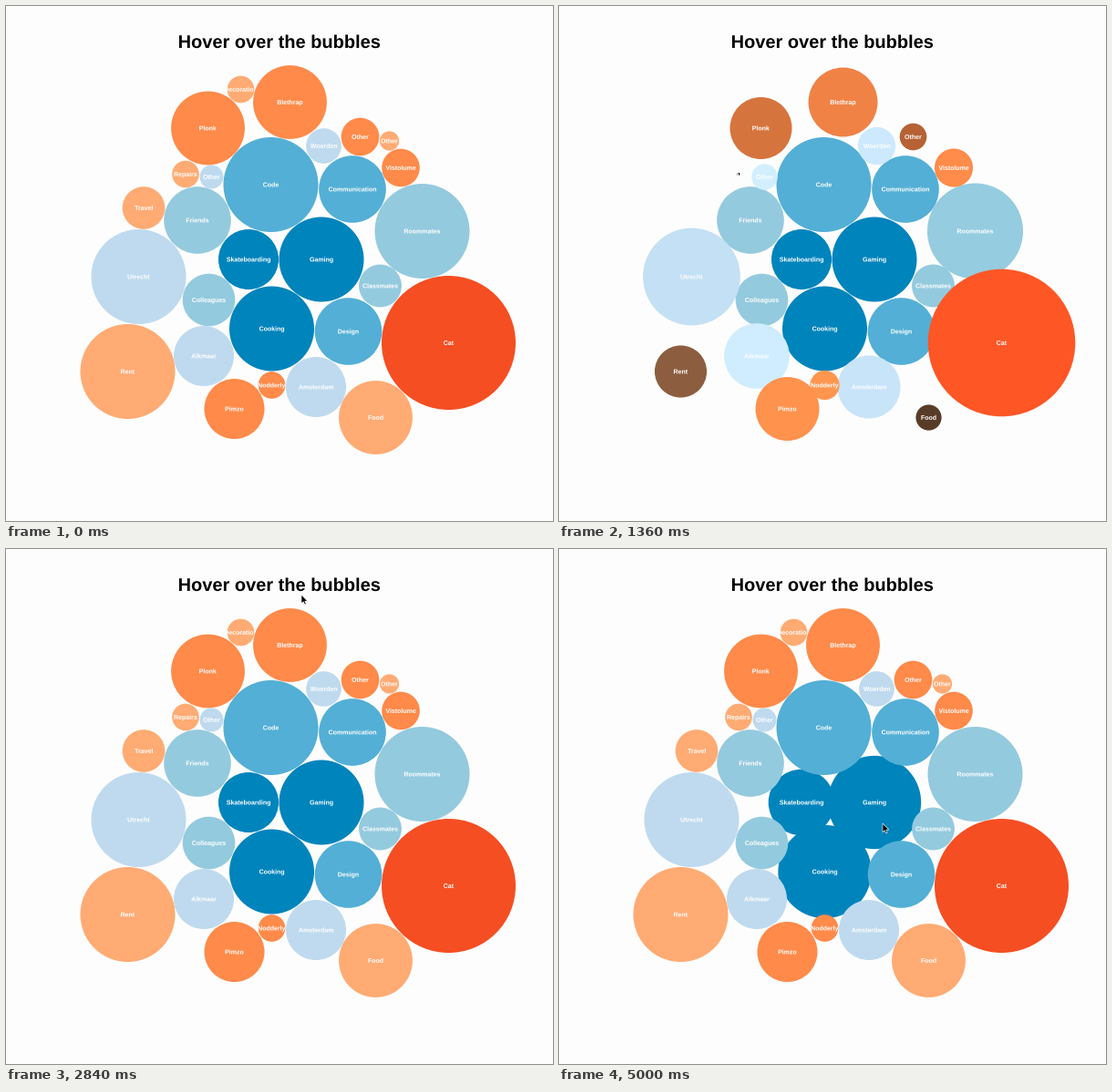
A matplotlib script for the animation above (5.04 s loop, 600 by 565 pixels).

```python
import numpy as np
import matplotlib.pyplot as plt
from matplotlib.animation import FuncAnimation
from matplotlib.patches import Circle, PathPatch, Polygon, Rectangle
from matplotlib.textpath import TextPath
from matplotlib.transforms import Affine2D

W, H, DPI = 600, 565, 64
FRAMES, STEP = 126, 40
CHART_TOP = 65

RELOAD, FIRST_POP = 600, 611      # ms
POP_GAP, POP_TIME = 30.7, 515
HOVER_TIME, HOVER_GROWTH = 240, 0.1

# colour of each group, then its bubbles: label, centre x, centre y, radius
GROUPS = [
    ("#0084bc", [("Skateboarding", 266, 278, 33),
                 ("Gaming", 346, 278, 46.5),
                 ("Cooking", 291.5, 354, 46.5)]),
    ("#53afd5", [("Code", 290.5, 196, 52),
                 ("Design", 375.5, 357, 36.8),
                 ("Communication", 380, 201, 36.8)]),
    ("#94cade", [("Colleagues", 222.5, 322.5, 28.8),
                 ("Friends", 210, 235, 36.8),
                 ("Classmates", 410.5, 307, 23.4),
                 ("Roommates", 456.5, 247, 52)]),
    ("#bfdaee", [("Utrecht", 145.5, 297, 52),
                 ("Amsterdam", 340, 418, 33),
                 ("Woerden", 348.5, 153.5, 19.3),
                 ("Alkmaar", 217, 384, 33),
                 ("Other", 225.5, 187.5, 13)]),
    ("#f54e22", [("Cat", 485.5, 369.5, 73.5)]),
    ("#ff8a49", [("Nodderly", 291.5, 416, 14.8),
                 ("Pimzo", 250.5, 442, 33),
                 ("Vistolume", 433, 177.5, 20.8),
                 ("Blethrap", 311.5, 105.5, 40.4),
                 ("Plonk", 221.5, 134, 40.4),
                 ("Other", 388.5, 143.5, 20.8)]),
    ("#ffab73", [("Rent", 133.5, 401, 52),
                 ("Food", 405.5, 451.5, 40.4),
                 ("Repairs", 197, 184.5, 14.8),
                 ("Travel", 151, 221.5, 23.3),
                 ("Decoration", 257.5, 91.5, 14.8),
                 ("Other", 420.5, 148, 10.6)]),
]

# pointer stops: time, x, y
STOPS = [(2680, 334, 11), (3040, 310, 105), (3480, 310, 105),
         (4000, 292, 211), (4320, 292, 211), (4800, 355, 301)]
ARROW = np.array([(0, 0), (0, 9.6), (2.2, 7.6), (3.8, 11),
                  (5.3, 10.3), (3.8, 7), (6.8, 7)])
BEAM = np.array([(-1.7, -4.5), (0, -4), (1.7, -4.5), (0, -4),
                 (0, 4), (-1.7, 4.5), (0, 4), (1.7, 4.5)])

fig = plt.figure(figsize=(W / DPI, H / DPI), dpi=DPI, facecolor="#fefdfe")
ax = fig.add_axes([0, 0, 1, 1])
ax.set(xlim=(0, W), ylim=(H, 0))
ax.axis("off")


def smooth(u):
    u = np.clip(u, 0, 1)
    return u * u * (3 - 2 * u)


def back_out(u):
    """Ease out with a ten percent overshoot."""
    v = np.clip(u, 0, 1) - 1
    return 1 + 2.70158 * v ** 3 + 1.70158 * v ** 2


def add_text(text, x, baseline, size, color, z):
    """Bold text as outlines, centred on x."""
    font = {"family": "Liberation Sans", "weight": "bold"}
    path = TextPath((0, 0), text, size=size, prop=font)
    box = path.get_extents()
    flip = Affine2D().translate(-(box.x0 + box.x1) / 2, 0).scale(1, -1)
    path = flip.translate(x, baseline).transform_path(path)
    return ax.add_patch(PathPatch(path, fc=color, lw=0, zorder=z))


class Bubble:
    def __init__(self, index, group, color, label, x, y, radius):
        self.index, self.group = index, group
        self.x, self.y, self.radius = x, y, radius
        self.rgb = np.array(plt.matplotlib.colors.to_rgb(color))
        self.disc = ax.add_patch(Circle((x, y), radius, lw=0, zorder=index + 1))
        self.disc.set_clip_path(chart)
        self.label = add_text(label, x, y + 2.4, 7, "white", index + 1.5)

    def contains(self, x, y):
        return np.hypot(x - self.x, y - self.y) < self.radius

    def pop(self, ms):
        if ms < RELOAD:
            return 1
        return back_out((ms - FIRST_POP - self.index * POP_GAP) / POP_TIME)

    def update(self, ms, hover):
        pop = self.pop(ms)
        shown = pop > 0.01
        self.disc.set_visible(shown)
        self.label.set_visible(shown)
        if shown:
            self.disc.set_radius(self.radius * pop * (1 + HOVER_GROWTH * hover))
            self.disc.set_facecolor(np.clip(self.rgb * pop, 0, 1))
            self.label.set_clip_path(self.disc)


def pointer_at(ms):
    if ms < STOPS[0][0]:
        return None
    for (t0, *a), (t1, *b) in zip(STOPS, STOPS[1:]):
        if ms < t1:
            break
    return np.array(a) + (np.array(b) - a) * smooth((ms - t0) / (t1 - t0))


def hovered(ms):
    spot = pointer_at(ms)
    hits = [] if spot is None else [b for b in bubbles if b.contains(*spot)]
    return hits[-1] if hits else None


def hover_levels():
    """Growth of every group in every frame."""
    level = np.zeros((FRAMES, len(GROUPS)))
    for i in range(1, FRAMES):
        bubble = hovered(i * STEP)
        change = np.full(len(GROUPS), -STEP / HOVER_TIME)
        if bubble:
            change[bubble.group] *= -1
        level[i] = np.clip(level[i - 1] + change, 0, 1)
    return smooth(level)


chart = ax.add_patch(Rectangle((0, CHART_TOP), W, H - CHART_TOP, fc="none", lw=0))
add_text("Hover over the bubbles", W / 2, 46, 20, "black", 0)

bubbles = []
for g, (color, members) in enumerate(GROUPS):
    for member in members:
        bubbles.append(Bubble(len(bubbles), g, color, *member))
levels = hover_levels()

arrow = ax.add_patch(Polygon(ARROW, fc="black", ec="white", lw=0.7, zorder=50))
beam, = ax.plot([], [], color="#222222", lw=0.9, zorder=50)


def draw(i):
    ms = i * STEP
    for b in bubbles:
        b.update(ms, levels[i, b.group])

    spot, target = pointer_at(ms), hovered(ms)
    on_text = (target is not None and abs(spot[1] - target.y) < 4
               and abs(spot[0] - target.x) < 16)
    arrow.set_visible(spot is not None and not on_text)
    beam.set_visible(on_text)
    if spot is not None:
        arrow.set_xy(ARROW + spot)
        beam.set_data(*(BEAM + spot).T)
    return []


anim = FuncAnimation(fig, draw, frames=FRAMES, interval=STEP, repeat=True,
                     repeat_delay=0, blit=False)
plt.show()
```
